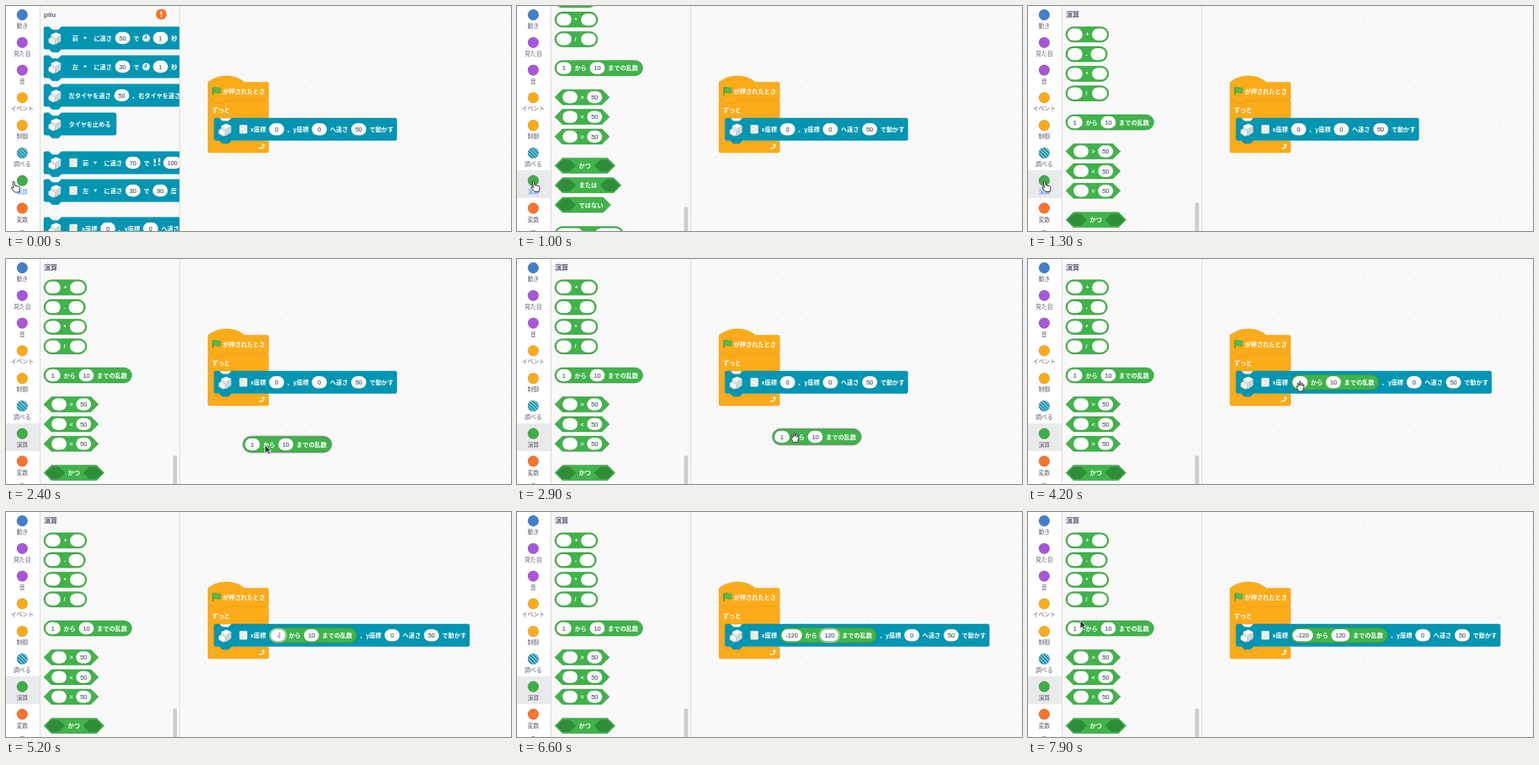
Animation, 600 px wide and 267 px high, one loop 8 s. Source, as an HTML page:

```html
<!DOCTYPE html>
<html lang="ja">
<head>
<meta charset="utf-8">
<style>
html,body{margin:0;width:100%;height:100%;overflow:hidden;background:#f9f9f9}
svg{display:block;width:600px;height:267px}
text{font-family:"Liberation Sans","Noto Sans CJK JP","Noto Sans CJK",sans-serif;font-size:7.2px;white-space:pre}
.label{fill:#fff;font-weight:700}
.value{fill:#575e75;stroke:#575e75;stroke-width:.2;text-anchor:middle}
.head{fill:#575e75;font-size:8px;font-weight:700}
.cat{fill:#575e75;font-size:6.9px;text-anchor:middle}
.hover .cat:nth-of-type(7){fill:#4c97ff}
.drag{filter:drop-shadow(0 0 1.3px rgba(0,0,0,.75))}
</style>
</head>
<body>
<svg viewBox="0 0 600 267">
  <defs>
    <pattern id="dots" x="210" y="8" width="18" height="18" patternUnits="userSpaceOnUse">
      <rect x="8" y="8.5" width="1.6" height="1" fill="#e2e2e4"/>
    </pattern>
    <pattern id="stripes" width="3" height="3" patternUnits="userSpaceOnUse" patternTransform="rotate(45)">
      <rect width="3" height="3" fill="#a9d8e3"/><rect width="3" height="1.9" fill="#0c8fad"/>
    </pattern>
    <clipPath id="flyout"><rect x="41" width="165.5" height="267"/></clipPath>
  </defs>
  <rect width="600" height="267" fill="#f9f9f9"/>
  <rect x="206" width="394" height="267" fill="url(#dots)"/>
  <g id="script"></g>
  <g clip-path="url(#flyout)">
    <rect x="41" width="166" height="267" fill="#f9f9f9"/>
    <g id="robot"></g>
    <g id="operators"></g>
    <rect id="scroll" x="198.4" width="4.8" height="60" rx="2.4" fill="#cecdce"/>
  </g>
  <path d="M206.5 0V267" stroke="#dcdcde"/>
  <rect width="40" height="267" fill="#fff"/>
  <rect id="selected" y="195" width="40" height="33" fill="#e9eaec"/>
  <path d="M40.5 0V267" stroke="#dcdcde"/>
  <g id="categories"></g>
  <g id="drag" class="drag"></g>
  <g id="cursor"></g>
</svg>
<script>
const $ = id => document.getElementById(id);
const GAP = 3.6, FIELD = 18;
const TEAL = ['#0095b1', '#008da8'], GREEN = ['#40b34a', '#2f8d38'], GOLD = ['#fcab19', '#e39a17'];

const text = (x, y, s, cls = 'label') => `<text class="${cls}" x="${x}" y="${y + 2.6}">${s.replace('<', '&lt;')}</text>`;
const shape = (d, [fill, line]) => `<path d="${d}" fill="${fill}" stroke="${line}" stroke-width=".5"/>`;
const charWidth = c => c > '~' ? 7.2 : c === '-' ? 2.4 : 4;
const textWidth = s => [...s].reduce((sum, c) => sum + charWidth(c), 0);

function field(x, cy, value, mode) {
  const tw = textWidth(value), w = Math.max(FIELD, tw + 10), mid = x + w / 2;
  let svg = `<rect x="${x}" y="${cy - 7.2}" width="${w}" height="14.4" rx="7.2" fill="#fff"`;
  svg += mode ? ' stroke="#fff" stroke-opacity=".45" stroke-width="3.4"/>' : ' stroke="#000" stroke-opacity=".18" stroke-width=".4"/>';
  if (mode) svg += `<rect x="${x}" y="${cy - 7.2}" width="${w}" height="14.4" rx="7.2" fill="#fff" stroke="#2f8d38" stroke-width=".5"/>`;
  if (mode === 'select') svg += `<rect x="${mid - tw / 2 - .5}" y="${cy - 4}" width="${tw + 1}" height="8" fill="#b3d7fe"/>`;
  svg += text(mid, cy, value, 'value');
  if (mode === 'caret') svg += `<path d="M${mid + tw / 2 + .6} ${cy - 3.6}v7.2" stroke="#333" stroke-width=".6"/>`;
  return { svg, w };
}

const hexagon = (x, cy, w, r) => `M${x} ${cy}l${r} ${-r}h${w - 2 * r}l${r} ${r}l${-r} ${r}h${2 * r - w}Z`;

const icons = {
  clock: (x, y) => `<circle cx="${x}" cy="${y}" r="4.6" fill="#d9f0f6"/><path d="M${x} ${y - 3}V${y}H${x - 2.4}" fill="none" stroke="#1b7fa0"/>`,
  steps: (x, y) => `<path d="M${x - 2} ${y - 4.5}v5m0 1.4v2M${x + 3.4} ${y - 5.5}v5m0 1.4v2" stroke="#fff" stroke-width="2.2"/>`,
  map: (x, y) => `<rect x="${x - 4.5}" y="${y - 5}" width="9" height="10" rx=".8" fill="#f4f5ee" stroke="#cdd5d2" stroke-width=".5"/>
    <path d="M${x - 2} ${y - 2}h1.3M${x + 1} ${y}h1.4" stroke="#d99"/><path d="M${x - 2} ${y + 2.2}h1.3" stroke="#9b9"/>`,
  robot: (x, y) => `<path d="M${x - 4} ${y - 4}l6-2.6 5.6 2.6v7.6l-6 4-5.6-3Z" fill="#e6e9ea"/>
    <path d="M${x - 4} ${y - 4}l6-2.6 5.6 2.6-6 3Z" fill="#fff"/><path d="M${x + 1.6} ${y - 1}l6-3v7.6l-6 4Z" fill="#cfd5d7"/>
    <path d="M${x - 7} ${y + 1}l3-2 5 3v5.4l-3 .8-5-3Z" fill="#f3f4f4" stroke="#8c999e" stroke-width=".5"/>`,
  loop: (x, y) => `<path d="M${x - 3} ${y + 2.5}h3a2.6 2.6 0 0 0 2.4-3.6" fill="none" stroke="#fff" stroke-width="1.3"/><path d="M${x - .2} ${y - .8}l2.4-2.6 2.2 2.6Z" fill="#fff"/>`,
  flag: (x, y) => `<path d="M${x - 4} ${y - 4.2}q2.4-1.3 4.4 0t4.4 0v6q-2.4 1.2-4.4 0t-4.4 0" fill="#4cbf56" stroke="#3b8f42" stroke-width=".6"/><path d="M${x - 4.1} ${y - 4.6}v9.6" stroke="#45993d" stroke-width="1.3"/>`
};

// "(50)" is a value field, "<>" a boolean slot, "@name" an icon, "前▼" a menu.
function row(x, cy, items, modes = []) {
  let svg = '', count = 0;
  for (const item of items) {
    let w;
    if (item[0] === '(') {
      const f = field(x, cy, item.slice(1, -1), modes[count++]);
      svg += f.svg; w = f.w;
    } else if (item === '<>') {
      w = 23; svg += `<path d="${hexagon(x, cy, w, 7.2)}" fill="${GREEN[1]}"/>`;
    } else if (item[0] === '@') {
      w = 9; svg += icons[item.slice(1)](x + 4.5, cy);
    } else if (item.endsWith('▼')) {
      w = 31;
      svg += text(x + 9, cy, item.slice(0, -1)) + `<path d="M${x + 22} ${cy - 1.2}h4.4l-2.2 2.8Z" fill="#fff"/>`;
    } else {
      w = textWidth(item); svg += text(x, cy, item);
    }
    x += w + GAP;
  }
  return { svg, end: x - GAP };
}

const notch = 'h3.6c1 0 1.4.4 1.8.9l1.8 1.8c.5.6 1 .9 1.8.9h5.4c.8 0 1.3-.3 1.8-.9l1.8-1.8c.4-.5.8-.9 1.8-.9';
const bump = 'c-1 0-1.4.4-1.8.9l-1.8 1.8c-.5.6-1 .9-1.8.9h-5.4c-.8 0-1.3-.3-1.8-.9l-1.8-1.8c-.4-.5-.8-.9-1.8-.9H';

function stackBody(x, cy, right) {
  const top = cy - 13.2, low = cy + 13.2;
  return shape(`M${x} ${top + 1.8}q0-1.8 1.8-1.8${notch}H${right - 1.8}q1.8 0 1.8 1.8V${low - 1.8}q0 1.8-1.8 1.8H${x + 21.6}${bump}${x + 1.8}q-1.8 0-1.8-1.8Z`, TEAL)
    + icons.robot(x + 12.5, cy);
}

function stack(x, cy, items, start, right) {
  const r = row(start, cy, items);
  return stackBody(x, cy, right || r.end + 6) + r.svg;
}

function reporter(x, cy, items, pad = 1.8, modes) {
  const r = row(x + 1.8, cy, items, modes), w = r.end + pad - x;
  return { svg: `<rect x="${x}" y="${cy - 9}" width="${w}" height="18" rx="9" fill="${GREEN[0]}" stroke="${GREEN[1]}" stroke-width=".6"/>` + r.svg, w };
}
const random = (x, cy, a = '1', b = '10', modes) => reporter(x, cy, [`(${a})`, 'から', `(${b})`, 'までの乱数'], 5.4, modes);

function boolean(cy, items, start, pad) {
  const r = row(start, cy, items);
  return shape(hexagon(45, cy, r.end + pad - 45, 9), GREEN) + r.svg;
}

function buildStatic() {
  const cats = [['動き', '#427fc9'], ['見た目', '#a457dc'], ['音', '#a957d6'], ['イベント', '#fcab19'], ['制御', '#fcab19'],
    ['調べる', 'url(#stripes)'], ['演算', '#3fae49'], ['変数', '#f9742c'], ['', '#f9742c']];
  $('categories').innerHTML = cats.map(([name, color], i) => {
    const y = 10.5 + i * 32.78;
    return `<circle cx="19.3" cy="${y}" r="6.4" fill="${color}" stroke="#000" stroke-opacity=".2" stroke-width=".6"/>` + text(19.3, y + 13, name, 'cat');
  }).join('');

  $('robot').innerHTML = text(45, 10, 'pilu', 'head')
    + '<circle cx="184.5" cy="9.8" r="6.4" fill="#f0762b"/><path d="M184.5 6v4.6m0 1.2v1.7" stroke="#fff" stroke-width="1.5"/>'
    + stack(45, 38, ['前▼', 'に速さ', '(50)', 'で', '@clock', '(1)', '秒'], 69.8, 230)
    + stack(45, 72, ['左▼', 'に速さ', '(30)', 'で', '@clock', '(1)', '秒'], 69.8, 230)
    + stack(45, 106, ['左タイヤを速さ', '(50)', '、右タイヤを速さ'], 74.5, 230)
    + stack(45, 140, ['タイヤを止める'], 74.5)
    + stack(45, 186, ['前▼', 'に速さ', '(70)', 'で', '@steps', '(100)'], 82, 230) + icons.map(80, 186)
    + stack(45, 219, ['左▼', 'に速さ', '(30)', 'で', '(90)', '度'], 82, 230) + icons.map(80, 219)
    + stack(45, 264, ['x座標', '(0)', '、y座標', '(0)', 'へ速さ'], 90, 230) + icons.map(80, 264);

  $('operators').innerHTML = text(45, 10, '演算', 'head')
    + ['+', '-', '*', '/'].map((op, i) => reporter(45, 33.8 + i * 23.3, ['()', op, '()']).svg).join('')
    + random(45, 138).svg
    + ['>', '<', '='].map((op, i) => boolean(172.5 + i * 23.4, ['()', op, '(50)'], 54, 8.6)).join('')
    + boolean(253.7, ['<>', 'かつ', '<>'], 47, 2)
    + boolean(277, ['<>', 'または', '<>'], 47, 2)
    + boolean(300.4, ['<>', 'ではない'], 47, 9)
    + reporter(45, 335, ['(りんご)', 'と', '(バナナ)']).svg;
}

function script({ joined, a, b, modes, target }) {
  let svg = shape('M240 112H310.2q1.8 0 1.8 1.8V131.2q0 1.8-1.8 1.8H247.2V160H310.2q1.8 0 1.8 1.8V172.2q0 1.8-1.8 1.8H241.8q-1.8 0-1.8-1.8Z', GOLD)
    + shape(`M240 90.4c11.2-9.9 32-9.9 43.2 0H310.2q1.8 0 1.8 1.8V110.2q0 1.8-1.8 1.8H261.6${bump}241.8q-1.8 0-1.8-1.8Z`, GOLD)
    + icons.flag(250, 101) + text(257.5, 101, 'が押されたとき') + text(244.7, 123, 'ずっと') + icons.loop(303.5, 166.3);
  const cy = 146.3, slotX = 312.5;
  const slot = joined ? random(slotX, cy, a, b, modes) : field(slotX, cy, '0');
  const rest = row(slotX + slot.w + GAP, cy, ['、y座標', '(0)', 'へ速さ', '(50)', 'で動かす']);
  svg += stackBody(247.2, cy, rest.end + 3.8) + icons.map(282, cy) + text(290.5, cy, 'x座標');
  if (target) svg += `<rect x="${slotX - 1}" y="${cy - 8.2}" width="20" height="16.4" rx="8.2" fill="none" stroke="#fff" stroke-width="2" stroke-opacity=".8"/>`;
  return svg + slot.svg + rest.svg;
}

const cursors = {
  arrow: '<path d="M0 0V10L2.4 7.9 4 11.4 5.8 10.6 4.3 7.2H7.4Z" fill="#333" stroke="#fff" stroke-width=".8"/>',
  point: '<path d="M-1 0q1-1.2 2 0l.8 4.2 4.5 1q1.4.4 1.2 2L6.6 12H1.6L-2.6 7.4q-.3-1.6 1.5-1l1 .8Z" fill="#fff" stroke="#222" stroke-width=".9"/>',
  hand: '<path d="M-4 1q-.6-1.6 1-1.2l1 1-.9-4q.5-1.3 1.5-.2l.7 2.6V-4.4q.8-1 1.6 0V-.8l.9-3q1.1-.8 1.5.3L3 0l1-1.8q1.2-.4 1.2.8L4 4.2 3 6H-1.4Z" fill="#fff" stroke="#222" stroke-width=".8"/>'
};

const at = (keys, t) => keys.reduce((found, key) => t >= key[0] ? key : found, [0]).slice(1);
const dragPath = [[2300, 178, 184], [2400, 282, 220], [2500, 297, 223], [2600, 303, 222], [2900, 304, 211], [3000, 303, 194], [3100, 301, 176], [3200, 299, 161], [3300, 297.7, 153.9]];
const pointer = [[0, 'point', 9, 209], [500, 'point', 16, 209], [1000, 'point', 19.5, 208.5], [1800, 'arrow', 71, 138],
  [3800, 'hand', 323, 154], [4100, 'hand', 323, 151], [4300, 'arrow', 323, 147], [4700],
  [7200, 'arrow', 330, 168], [7700, 'arrow', 221, 156], [7800, 'arrow', 112, 137], [7900, 'arrow', 62, 128.5]];
const firstValue = [[0, '1'], [5200, '-'], [5300, '-1'], [5600, '-12'], [5700, '-120']];
const secondValue = [[0, '10'], [6400, '1'], [6500, '12'], [6600, '120']];
const firstMode = [[0, ''], [4600, 'select'], [5200, 'caret'], [6000, '']];
const secondMode = [[0, ''], [6000, 'select'], [6400, 'caret'], [6600, 'edit'], [6900, '']];

let shown = -1;
function render(t) {
  const step = Math.floor(t / 100);
  if (step === shown) return;
  shown = step;
  t = step * 100;

  const opened = t >= 1000, dragging = t >= 2300 && t < 3800;
  const offset = opened && t < 1300 ? 64.3 * Math.pow(.7, (t - 1000) / 100 * 6) : 0;
  $('selected').style.display = $('operators').style.display = $('scroll').style.display = opened ? '' : 'none';
  $('robot').style.display = opened ? 'none' : '';
  $('operators').setAttribute('transform', `translate(0 ${-offset})`);
  $('scroll').setAttribute('y', 233 + offset * .08);
  $('categories').setAttribute('class', t < 1800 ? 'hover' : '');

  $('script').innerHTML = script({
    joined: t >= 3800, target: t >= 3200 && t < 3800,
    a: at(firstValue, t)[0], b: at(secondValue, t)[0],
    modes: [at(firstMode, t)[0], at(secondMode, t)[0]]
  });

  let [kind, x, y] = at(pointer, t);
  $('drag').innerHTML = '';
  if (dragging) {
    const [bx, by] = at(dragPath, t);
    $('drag').innerHTML = random(bx, by).svg;
    kind = t < 2600 ? 'arrow' : 'hand';
    x = bx + 25.7;
    y = by + .5;
  }
  $('cursor').innerHTML = kind ? `<g transform="translate(${x} ${y})">${cursors[kind]}</g>` : '';
}

buildStatic();
const start = performance.now();
(function tick() {
  render((performance.now() - start) % 8000);
  requestAnimationFrame(tick);
})();
</script>
</body>
</html>
```
